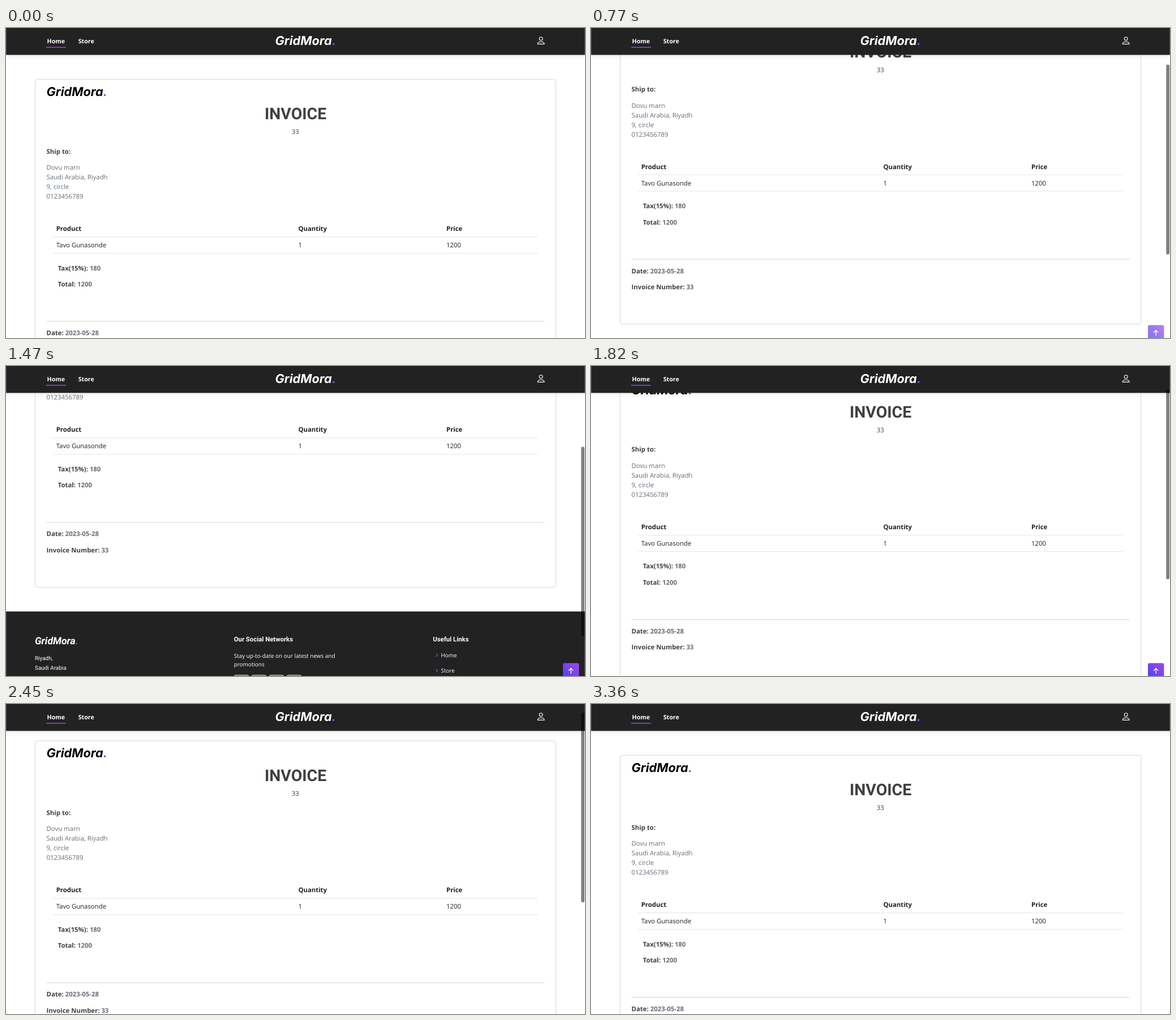
An HTML page for the animation above (3.43 s loop, 1023 by 547 pixels).

```html
<!DOCTYPE html>
<html lang="en">
<head>
<meta charset="utf-8">
<title>Invoice</title>
<style>
  html, body { margin: 0; height: 100%; overflow: hidden; background: #fff; }
  svg { display: block; width: 100%; height: 100%; }
  text { font: 11.37px "Open Sans", "Noto Sans", sans-serif; fill: #404040; text-rendering: geometricPrecision; white-space: pre; }
  .bold text, .bold { font-weight: 700; }
  .gray text, .gray { fill: #666e76; }
  .dark text { fill: #1d2125; }
  .logo { font: italic 700 21.7px Inter, sans-serif; }
  .dot { fill: #9b45e0; }
  .nav text { font-size: 10.66px; font-weight: 700; fill: #fff; }
  .nav .logo { font-size: 21.7px; fill: #fff; }
  .nav .dot, .foot .dot { fill: #9b45e0; }
  .bar { fill: #222; }
  .shadow { filter: drop-shadow(0 1.4px 4px rgba(0, 0, 0, .1)); }
  .line { fill: none; stroke-width: .75; }
  .foot text { font-size: 9.94px; fill: #fff; }
  .foot .head { font: 700 11.37px Roboto, sans-serif; }
  .foot .place { font-family: Roboto, sans-serif; }
  .foot .brand { font: italic 700 17.6px Roboto, sans-serif; }
  .icon { fill: none; stroke: #fff; stroke-width: 1.1; }
</style>
</head>
<body>
<svg viewBox="0 0 1023 547">
  <defs>
    <linearGradient id="violet" x1="0" y1="1" x2="1" y2="0">
      <stop stop-color="#4a42f4"/><stop offset="1" stop-color="#a048e4"/>
    </linearGradient>
  </defs>

  <g id="page">
    <rect class="line" x="51.5" y="90.6" width="920" height="541.3" rx="4" stroke="#c8c8c8"/>
    <text class="logo" x="71.5" y="120" style="fill:#000">GridMora<tspan class="dot">.</tspan></text>
    <text x="511.5" y="161.4" text-anchor="middle" style="font:700 28.42px Roboto,sans-serif">INVOICE</text>
    <text x="511.3" y="187.4" text-anchor="middle">33</text>
    <text class="bold" x="71.6" y="221.5">Ship to:</text>
    <g class="gray">
      <text x="71.6" y="250">Dovu marn</text>
      <text x="71.6" y="267">Saudi Arabia, Riyadh</text>
      <text x="71.6" y="284">9, circle</text>
      <text x="71.6" y="301">0123456789</text>
    </g>
    <g class="dark">
      <g class="bold">
        <text x="88.7" y="358">Product</text>
        <text x="516.4" y="358">Quantity</text>
        <text x="778" y="358">Price</text>
      </g>
      <text x="88.7" y="387">Tavo Gunasonde</text>
      <text x="516.4" y="387">1</text>
      <text x="778" y="387">1200</text>
    </g>
    <path class="line" d="M83 368.5H940M83 397.5H940" stroke="#d8dce0"/>
    <path class="line" d="M71.6 517.5H951.5" stroke="#c4c4c4"/>
    <g class="bold">
      <text x="91.7" y="427.5">Tax(15%): <tspan class="gray">180</tspan></text>
      <text x="91.7" y="456">Total: <tspan class="gray">1200</tspan></text>
      <text x="71.6" y="542">Date: <tspan class="gray">2023-05-28</tspan></text>
      <text x="71.6" y="570.5">Invoice Number: <tspan class="gray">33</tspan></text>
    </g>

    <g class="foot">
      <rect class="bar" x=".2" y="674.7" width="1022.6" height="240"/>
      <text class="brand" x="51" y="733">GridMora<tspan class="dot">.</tspan></text>
      <text class="place" x="51" y="760.5">Riyadh,</text>
      <text class="place" x="51" y="777.3">Saudi Arabia</text>
      <text class="head" x="402.7" y="728">Our Social Networks</text>
      <text x="402.7" y="756.5">Stay up-to-date on our latest news and</text>
      <text x="402.7" y="771.5">promotions</text>
      <path class="icon" d="M403.5 815v-25q0-3 3-3h19q3 0 3 3v25m6 0v-25q0-3 3-3h19q3 0 3 3v25m6 0v-25q0-3 3-3h19q3 0 3 3v25m6 0v-25q0-3 3-3h19q3 0 3 3v25"/>
      <text class="head" x="754.3" y="728">Useful Links</text>
      <text x="768.5" y="755.5">Home</text>
      <text x="768.5" y="782.5">Store</text>
      <path class="icon" d="M759.8 749l2.8 2.8-2.8 2.8M759.8 776l2.8 2.8-2.8 2.8" style="stroke:#9b45e0"/>
    </g>
  </g>

  <g class="nav">
    <rect class="bar shadow" x=".2" y="-10" width="1022.6" height="57.5"/>
    <text x="72.6" y="26.8">Home</text>
    <text x="127.7" y="26.8">Store</text>
    <rect class="dot" x="71" y="33.3" width="34.8" height="1.5"/>
    <text class="logo" x="475.5" y="30">GridMora<tspan class="dot">.</tspan></text>
    <g class="icon">
      <circle cx="945.2" cy="18.9" r="2.9"/>
      <path d="M939.3 28.4c0-2.6 2-4.2 5.9-4.2s5.9 1.6 5.9 4.2z"/>
    </g>
  </g>

  <g id="top">
    <rect x="984" y="524.2" width="28.4" height="28.4" rx="2.8" fill="url(#violet)"/>
    <path class="icon" d="M998.1 543v-9.5m-4 4l4-4 4 4" style="stroke-width:1.3"/>
  </g>
  <rect id="thumb" x="1016.2" width="5.8" height="335" rx="2.8"/>
</svg>
<script>
const LOOP = 3430, TICK = 70;
const [page, topButton, thumb] = ['page', 'top', 'thumb'].map(id => document.getElementById(id));

const clamp = p => Math.min(1, Math.max(0, p));
const decay = rate => n => 1 - rate ** n;
const smooth = n => { const p = n / 8; return p * p * (3 - 2 * p); };

// Scroll gestures: start time, tick count, from, to, easing by tick
const gestures = [
  [560, 7, 0, 114, decay(.446)],
  [1120, 8, 113.6, 247, decay(.587)],
  [1680, 7, 245.2, 51.3, decay(.459)],
  [2240, 8, 52.1, -1, smooth],
];

function scrollAt(t) {
  if (t >= 3080) return 0;
  const g = gestures.findLast(([start]) => t >= start);
  if (!g) return 0;
  const [start, ticks, from, to, ease] = g;
  const n = Math.min(ticks, (t - start) / TICK + 1);
  return from + (to - from) * ease(n);
}

const fade = (t, start) => 1 - (1 - clamp((t - start) / 320)) ** 2;

function draw() {
  const now = performance.now() % LOOP;
  const t = Math.floor(now / TICK) * TICK;
  const y = scrollAt(t);
  page.setAttribute('transform', `translate(0 ${-y})`);
  topButton.setAttribute('opacity', fade(t, 620) - fade(t, 1820));
  thumb.setAttribute('y', Math.max(0, .59 * y));
  thumb.setAttribute('opacity', t < 560 ? 0 : .5 * clamp((3360 - t) / 210));
  requestAnimationFrame(draw);
}
draw();
</script>
</body>
</html>
```
